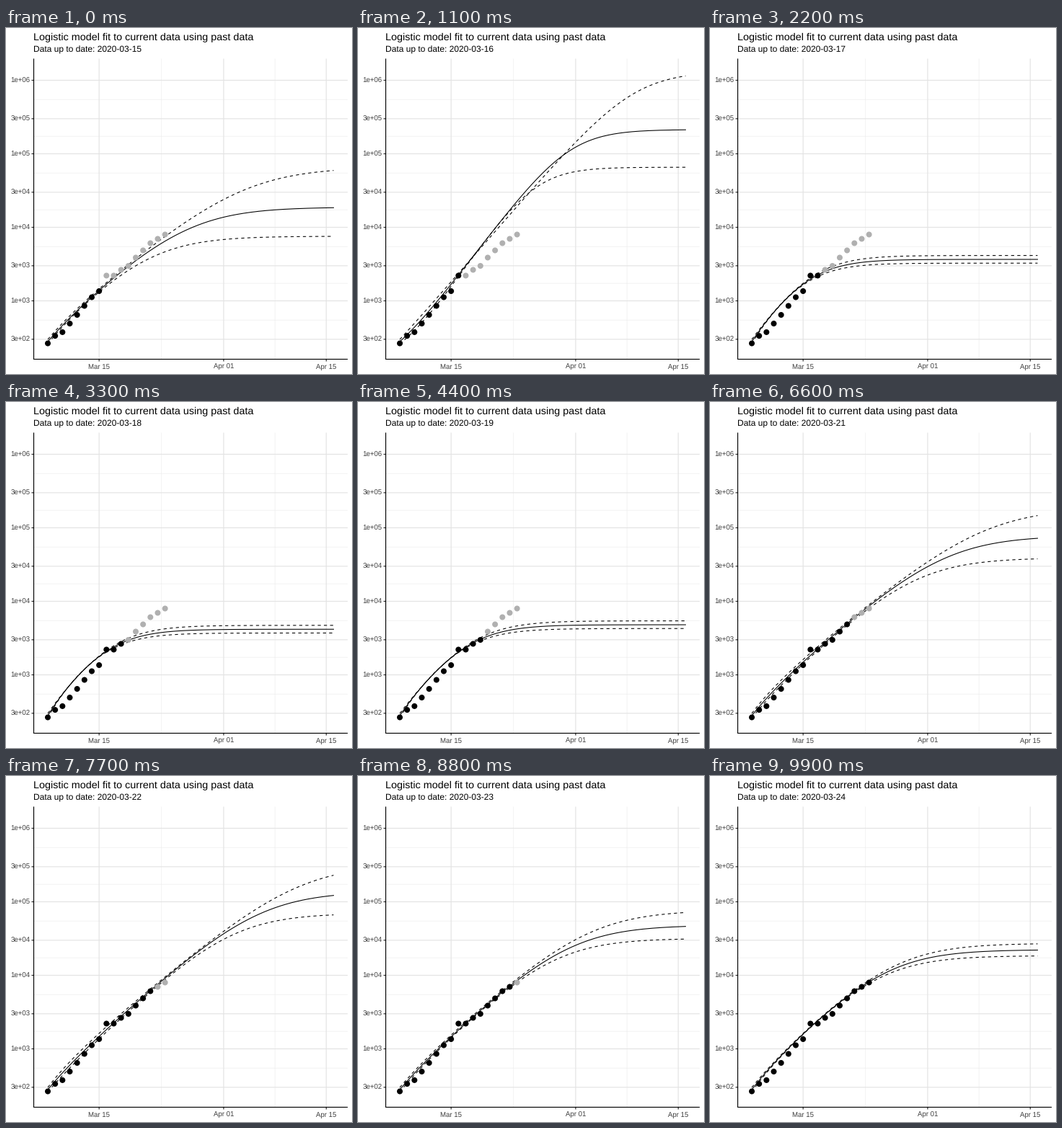
A matplotlib script that plays this animation: 480x480 px, repeating every 10000 ms.

```python
import numpy as np
import matplotlib.pyplot as plt
from matplotlib.animation import FuncAnimation

plt.rcParams.update({
    "font.family": "Liberation Sans",
    "text.hinting": "none",
    "toolbar": "None",
})

SIZE = 480
LEFT, RIGHT, TOP, BOTTOM = 38.5, 474, 42.5, 459.5
GRID, MINOR, LABEL = "#e3e3e3", "#ebebeb", "#404040"
PAST, FUTURE = "black", "#b0b0b0"
LINE, THEME_LINE = 1.07, 1.16

# Daily cumulative cases from 8 March
CASES = np.array([264, 334, 375, 491, 644, 854, 1120, 1356, 2205, 2205,
                  2640, 2989, 3875, 4857, 6087, 6970, 7980])
FIRST_CUT = 7           # last known day in the first fit
START = 279             # fitted count on day 0

# One fit per cut-off day: final size, time scale in days, upper / middle
FITS = [(18800, 4.9, 3.5), (213500, 3.27, 6.2), (3663, 3.25, 1.13),
        (4170, 3.4, 1.13), (4800, 3.55, 1.13), (40000, 5.1, 2.75),
        (78000, 5.05, 2.4), (138000, 4.93, 2.36), (48000, 4.8, 1.6),
        (22300, 4.6, 1.22)]


def x_of(day):
    """Pixel column of a day counted from 8 March."""
    return 58 + 10.165 * np.asarray(day)


def y_of(n):
    """Pixel row of a case count on the log scale."""
    return 378.5 - 102 * (np.log10(n) - 3)


def logistic(t, size, scale, start, cut, known):
    """Logistic with offset through (0, start) and (cut, known)."""
    q = (size - known) / (size - start)
    e = (1 - q) / (q * np.exp(cut / scale) - 1)
    return size - (size - start) * (1 + e) / (1 + e * np.exp(t / scale))


def fit_curves(t, k):
    """Middle, upper and lower curve of fit k, in pixels."""
    size, scale, ratio = FITS[k]
    cut = FIRST_CUT + k
    up = np.log(ratio)
    curves = []
    for side, spread in ((0, 0), (1, up), (-1, -up / (1 + 0.3 * up))):
        n = logistic(t, size * np.exp(spread), scale * np.exp(0.08 * spread),
                     START * 1.07 ** side, cut, CASES[cut] * 1.02 * 1.05 ** side)
        curves.append(y_of(n))
    return curves


days = np.linspace(0, 39, 157)
curves = [fit_curves(days, k) for k in range(len(FITS))]

fig = plt.figure(figsize=(SIZE / 72, SIZE / 72), dpi=72, facecolor="white")
ax = fig.add_axes([0, 0, 1, 1])
ax.set(xlim=(0, SIZE), ylim=(SIZE, 0))
ax.axis("off")


def rule(x, y, color, width=THEME_LINE, z=1):
    ax.plot(x, y, color=color, lw=width, zorder=z, snap=False,
            solid_capstyle="butt")


def text(x, y, s, size, color="black", ha="left"):
    return ax.text(x, y, s, fontsize=size, color=color, ha=ha, va="baseline")


# Grid, ticks and labels
x_ticks = {"Mar 15": 7, "Apr 01": 24, "Apr 15": 38}
y_ticks = [f"{m}e+0{p}" for p in range(2, 7) for m in (1, 3)][1:-1]
xs = x_of(list(x_ticks.values()))
ys = y_of([float(s) for s in y_ticks])

for x in (xs[1:] + xs[:-1]) / 2:
    rule([x, x], [TOP, BOTTOM], MINOR, THEME_LINE / 2, 0)
for y in (ys[1:] + ys[:-1]) / 2:
    rule([LEFT, RIGHT], [y, y], MINOR, THEME_LINE / 2, 0)
for x, label in zip(xs, x_ticks):
    rule([x, x], [TOP, BOTTOM], GRID)
    rule([x, x], [BOTTOM, BOTTOM + 3], "#222222")
    text(x, 473, label, 9.6, LABEL, "center")
for y, label in zip(ys, y_ticks):
    rule([LEFT, RIGHT], [y, y], GRID)
    rule([LEFT - 3, LEFT], [y, y], "#222222")
    text(33.2, y + 3.5, label, 9.6, LABEL, "right")
rule([LEFT, LEFT, RIGHT], [TOP, BOTTOM, BOTTOM], "black", z=4)

text(LEFT - 0.5, 17, "Logistic model fit to current data using past data", 14.4)
subtitle = text(LEFT - 0.5, 34, "", 12)

# Curves and points
lines = [ax.plot([], [], color="black", lw=LINE, ls=style, zorder=2,
                 dash_capstyle="butt")[0]
         for style in ("-", (0, (4, 4)), (0, (4, 4)))]
dots = ax.scatter(x_of(range(len(CASES))), y_of(CASES), s=8 ** 2,
                  linewidths=0, zorder=3)


def update(i):
    k = i // 11
    subtitle.set_text(f"Data up to date: 2020-03-{15 + k}")
    for line, y in zip(lines, curves[k]):
        line.set_data(x_of(days), y)
    dots.set_facecolor([PAST if j <= FIRST_CUT + k else FUTURE
                        for j in range(len(CASES))])
    return [subtitle, dots, *lines]


anim = FuncAnimation(fig, update, frames=100, interval=100,
                     repeat=True, repeat_delay=0)
plt.show()
```
